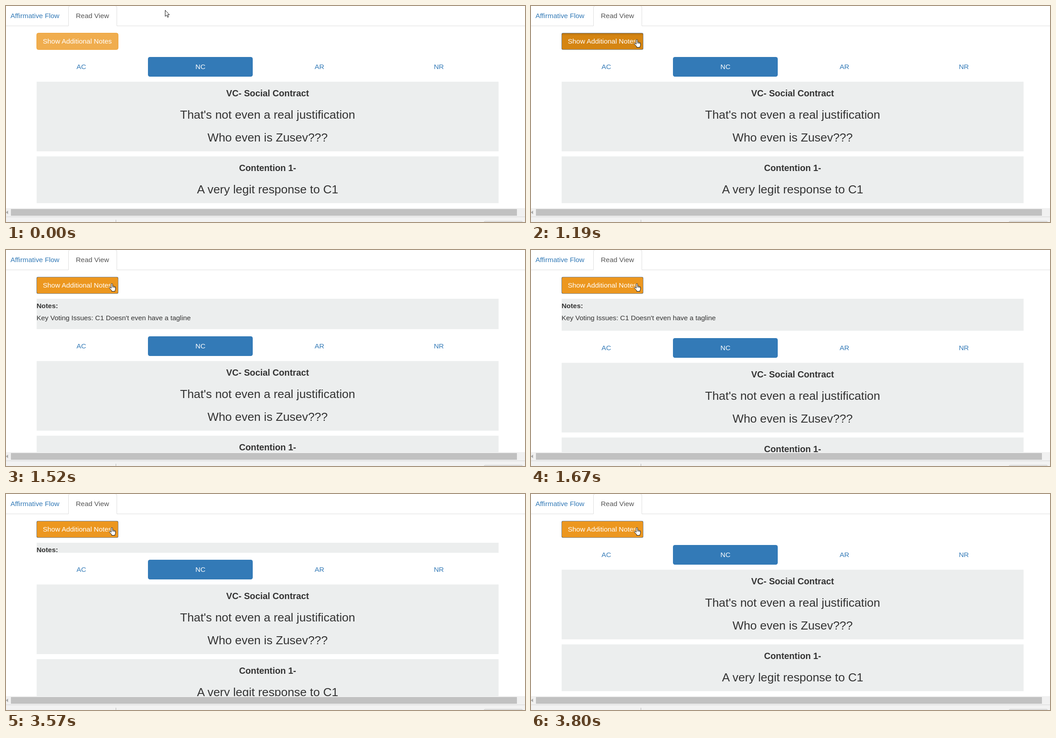
Recreate the animation shown at these times as an HTML page. Size 1159 by 483 pixels, loop 5.03 s.

```html
<!DOCTYPE html>
<html lang="en">
<head>
<meta charset="utf-8">
<title>Read View</title>
<style>
  html, body { margin: 0; width: 100%; height: 100%; overflow: hidden; background: #fff; }
  svg { display: block; width: 100%; height: 100%; }
  text { font: 15.4px "Liberation Sans", Arial, sans-serif; fill: #333; white-space: pre; }
  .mid { text-anchor: middle; }
  .link { fill: #337ab7; }
  .white { fill: #fff; }
  .bold { font-weight: bold; }
  .h4 { font-size: 19.8px; font-weight: bold; }
  .h3 { font-size: 26.4px; }
  .panel { fill: #eceeee; }
  .cursor { fill: #fff; stroke: #111; stroke-linejoin: round; }
</style>
</head>
<body>
<svg viewBox="0 0 1159 483">
  <defs>
    <clipPath id="page"><rect width="1159" height="452"/></clipPath>
    <clipPath id="fold"><rect id="foldBox" x="60" y="109" width="1045" height="0"/></clipPath>
    <linearGradient id="inset" x2="0" y2="1">
      <stop offset="0" stop-opacity=".14"/>
      <stop offset=".16" stop-opacity="0"/>
    </linearGradient>
  </defs>
  <rect width="1159" height="483" fill="#fff"/>

  <path d="M0 44.5H139.5V4Q139.5 -.5 144 -.5H243Q247.5 -.5 247.5 4V44.5H1159" fill="none" stroke="#ddd"/>
  <text x="10" y="27" class="link">Affirmative Flow</text>
  <text x="156" y="27" style="fill:#555">Read View</text>

  <rect id="btn" x="68.5" y="60.5" width="182" height="37" rx="4"/>
  <rect id="shade" x="69" y="61" width="181" height="36" rx="3.5" fill="url(#inset)"/>
  <rect id="ring" x="68.5" y="60.5" width="182" height="37" rx="2" fill="none" stroke="#7195c4" stroke-opacity=".8"/>
  <text x="82.3" y="84" class="white">Show Additional Notes</text>

  <g clip-path="url(#page)">
    <g clip-path="url(#fold)">
      <rect x="68.5" y="109" width="1031.5" height="72" class="panel"/>
      <text x="68.2" y="130" class="bold">Notes:</text>
      <text x="68.2" y="157">Key Voting Issues: C1 Doesn't even have a tagline</text>
    </g>
    <g id="content">
      <rect x="317" y="114" width="234" height="44" rx="4.4" fill="#337ab7"/>
      <text x="168.3" y="141" class="mid link">AC</text>
      <text x="434.2" y="141" class="mid white">NC</text>
      <text x="700" y="141" class="mid link">AR</text>
      <text x="966.5" y="141" class="mid link">NR</text>

      <rect x="68.5" y="169.3" width="1031.5" height="155.7" class="panel"/>
      <text x="584.2" y="202" class="mid h4">VC- Social Contract</text>
      <text x="584.2" y="252" class="mid h3">That's not even a real justification</text>
      <text x="584.2" y="303" class="mid h3">Who even is Zusev???</text>

      <rect x="68.5" y="336.3" width="1031.5" height="104.5" class="panel"/>
      <text x="584.2" y="369" class="mid h4">Contention 1-</text>
      <text x="584.2" y="419" class="mid h3">A very legit response to C1</text>
    </g>
  </g>

  <rect y="452" width="1159" height="19" fill="#f1f1f1"/>
  <rect x="11" y="454" width="1130" height="15" fill="#c1c1c1"/>
  <path d="M0 461.5L4.5 457.5V465.5Z" fill="#a3a3a3"/>
  <rect y="471" width="1159" height="12" fill="#f2f2f2"/>
  <path d="M0 471.5H1159" stroke="#d6d6d6"/>
  <path d="M245.5 478V483" stroke="#b4b4b4"/>
  <path d="M1067.5 484Q1067.5 481.5 1070 481.5H1151Q1153.5 481.5 1153.5 484" fill="#fafafa" stroke="#b8b8b8"/>

  <path id="arrow" class="cursor" d="M.5 .5V14.2L3.7 11.3 5.9 16.3 8 15.4 5.9 10.6H10Z"/>
  <g id="hand" class="cursor">
    <path d="M5 2Q6.5 -.3 8 2V6.8Q9.6 6.2 10.4 7.4 12 6.8 12.7 8.1 14.6 7.8 14.6 9.8V13Q14.6 15 13.2 16.5V18.5H6V16.5L1.2 11.6Q.3 9.8 1.8 9.4 3 9.3 5 11.4Z"/>
    <path d="M8 6.8V10M10.4 7.4V10.4M12.7 8.1V10.8" fill="none" stroke-width=".9"/>
  </g>
</svg>
<script>
const LOOP = 5030, OPEN_AT = 1267, CLOSE_AT = 3429, FOLD_MS = 350;
const NOTES_H = 71.5, MARGIN = 11;
const MOVES = [370, 440, 510, 580, 660, 730, 800, 870];
const TICKS = [0, ...MOVES, 960, 1040, 1190, 1270, 1360, 1440, 1520, 1600, 1670,
  3450, 3490, 3570, 3650, 3730, 3800];
const el = id => document.getElementById(id);
const show = (id, on) => el(id).setAttribute("visibility", on ? "visible" : "hidden");
const place = (id, x, y) => el(id).setAttribute("transform", `translate(${x} ${y})`);
const mix = (a, b, k) => a + (b - a) * k;

// CSS "ease": cubic-bezier(.25, .1, .25, 1)
function ease(x) {
  if (x <= 0) return 0;
  if (x >= 1) return 1;
  const curve = (s, a, b) => 3 * s * (1 - s) ** 2 * a + 3 * s * s * (1 - s) * b + s ** 3;
  let lo = 0, hi = 1;
  for (let i = 0; i < 24; i++) {
    const s = (lo + hi) / 2;
    if (curve(s, .25, .25) < x) lo = s; else hi = s;
  }
  return curve(lo, .1, 1);
}

function drawNotes(t) {
  const visible = t >= 1270 && t < 3800;
  const k = ease((t - OPEN_AT) / FOLD_MS) - ease((t - CLOSE_AT) / FOLD_MS);
  const h = visible ? NOTES_H * k : 0;
  el("foldBox").setAttribute("height", h);
  place("content", 0, visible ? Math.round(MARGIN + h) : 0);
}

function drawPointer(t) {
  const k = MOVES.filter(m => m <= t).length / MOVES.length;
  const s = k * k * (3 - 2 * k);
  const x = Math.round(mix(355, 240, s)), y = Math.round(mix(9, 71, s));
  const over = x < 251 && y > 60;
  const settle = t >= 1040 ? 1 : t >= 960 ? .5 : 0;
  place("arrow", x, y);
  place("hand", mix(234, 230, settle), Math.round(mix(71, 74, settle)));
  show("arrow", !over);
  show("hand", over);
  return over;
}

function drawButton(t, over) {
  const pressed = t >= 1190 && t < 1270, focused = t >= 1190;
  const [fill, line] = pressed ? ["#d58512", "#985f0d"]
    : focused ? ["#ec971f", "#985f0d"]
    : over ? ["#ec971f", "#d58512"] : ["#f0ad4e", "#eea236"];
  el("btn").setAttribute("fill", fill);
  el("btn").setAttribute("stroke", line);
  show("shade", pressed);
  show("ring", focused);
}

function draw(ms) {
  const t = TICKS.filter(m => m <= ms).pop();
  drawNotes(t);
  drawButton(t, drawPointer(t));
}

const start = performance.now();
function loop() {
  draw((performance.now() - start) % LOOP);
  requestAnimationFrame(loop);
}
loop();
</script>
</body>
</html>
```
